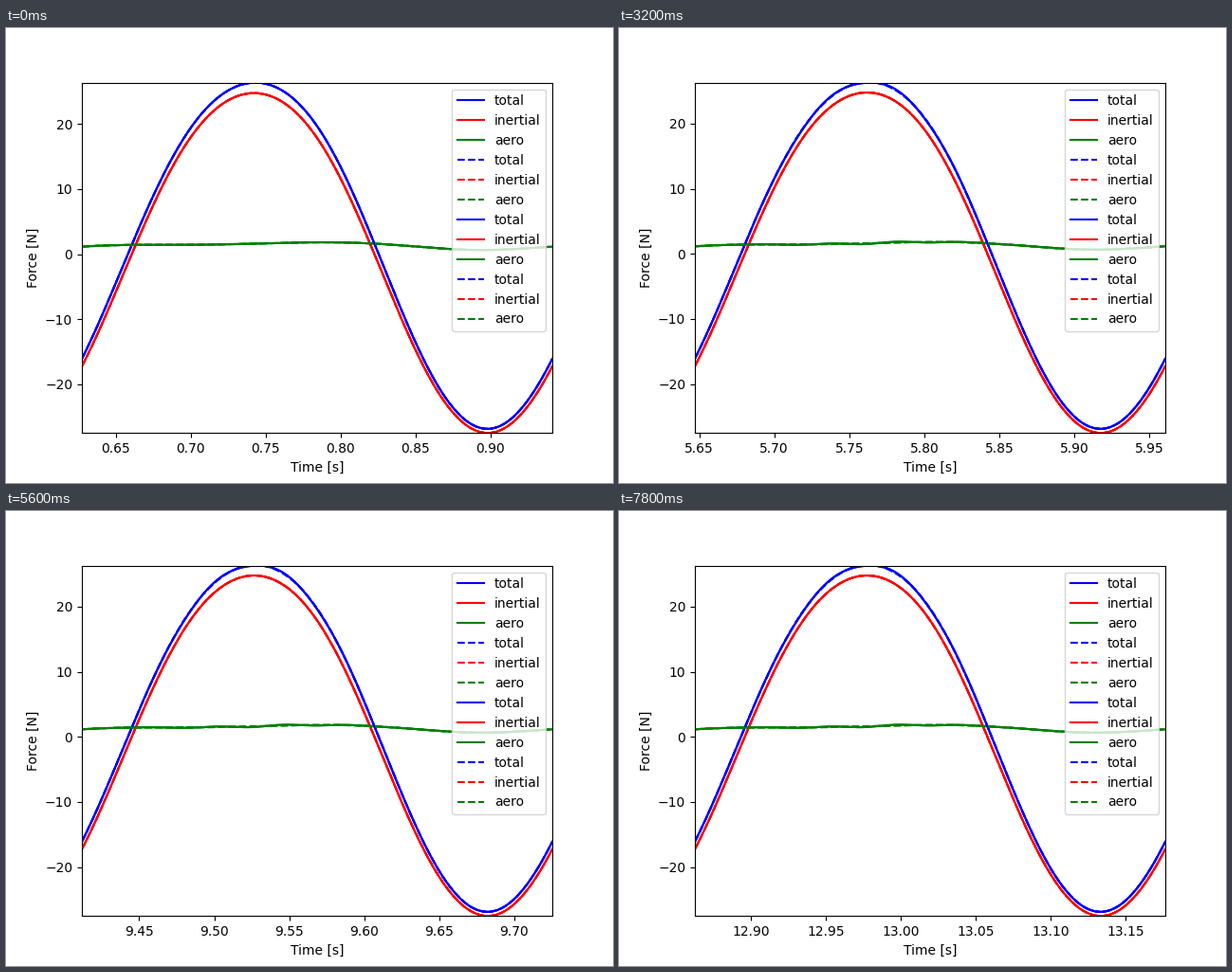
Write a matplotlib script that moves like this. It is 640 by 480 pixels and loops after 8000 ms.

```python
import numpy as np
import matplotlib.pyplot as plt
from matplotlib.animation import FuncAnimation

FRAMES = 40
STEP_MS = 200
PERIOD = 0.313725
COLORS = {"total": "blue", "inertial": "red", "aero": "green"}

phase = np.linspace(0, 1, 400)


def inertial_force(p):
    a = 2 * np.pi * (p - 0.364)
    return (26.42 * np.cos(a) - 1.37 * np.cos(2 * a)
            - 0.27 * np.cos(3 * a) + 0.12 * np.sin(2 * a))


def aero_force(p):
    """Smooth periodic curve through eight evenly spaced values."""
    knots = [1.15, 1.43, 1.45, 1.63, 1.82, 1.60, 0.95, 0.65]
    c = np.fft.rfft(knots) / len(knots)
    waves = [2 * c[k] * np.exp(2j * np.pi * k * p) for k in (1, 2, 3)]
    return (c[0] + sum(waves) + c[4] * np.cos(8 * np.pi * p)).real


def ripple(p):
    envelope = np.exp(-((p - 0.38) / 0.2) ** 2)
    return -0.12 * envelope * np.cos(2 * np.pi * (p - 0.357) / 0.145)


def ripple_level(n):
    """The ripple fades out at the start and again halfway."""
    return (1 - np.exp(-(n / 1.5) ** 2)) * (1 - 0.8 * np.exp(-((n - 20) / 1.5) ** 2))


INERTIAL = inertial_force(phase)
AERO = aero_force(phase)
RIPPLE = ripple(phase)

plt.rcParams["font.family"] = "DejaVu Sans"
fig, ax = plt.subplots(figsize=(6.4, 4.8), dpi=100)
ax.set_xlabel("Time [s]")
ax.set_ylabel("Force [N]")

lines = []
for style in ("-", "--", "-", "--"):
    for name, color in COLORS.items():
        line, = ax.plot([], [], style, color=color, label=name)
        lines.append((line, name, style))
ax.legend(loc="upper right")


def update(n):
    start = (n + 2) * PERIOD
    aero = {"-": AERO + ripple_level(n) * RIPPLE, "--": AERO}
    for line, name, style in lines:
        force = {"total": INERTIAL + aero[style],
                 "inertial": INERTIAL,
                 "aero": aero[style]}[name]
        line.set_data(start + phase * PERIOD, force)
    ax.set_xlim(start, start + PERIOD)
    ax.set_ylim(INERTIAL.min(), (INERTIAL + aero["-"]).max())
    return [line for line, _, _ in lines]


anim = FuncAnimation(fig, update, frames=FRAMES, interval=STEP_MS,
                     init_func=lambda: update(0), repeat=True, repeat_delay=0)
plt.show()
```
